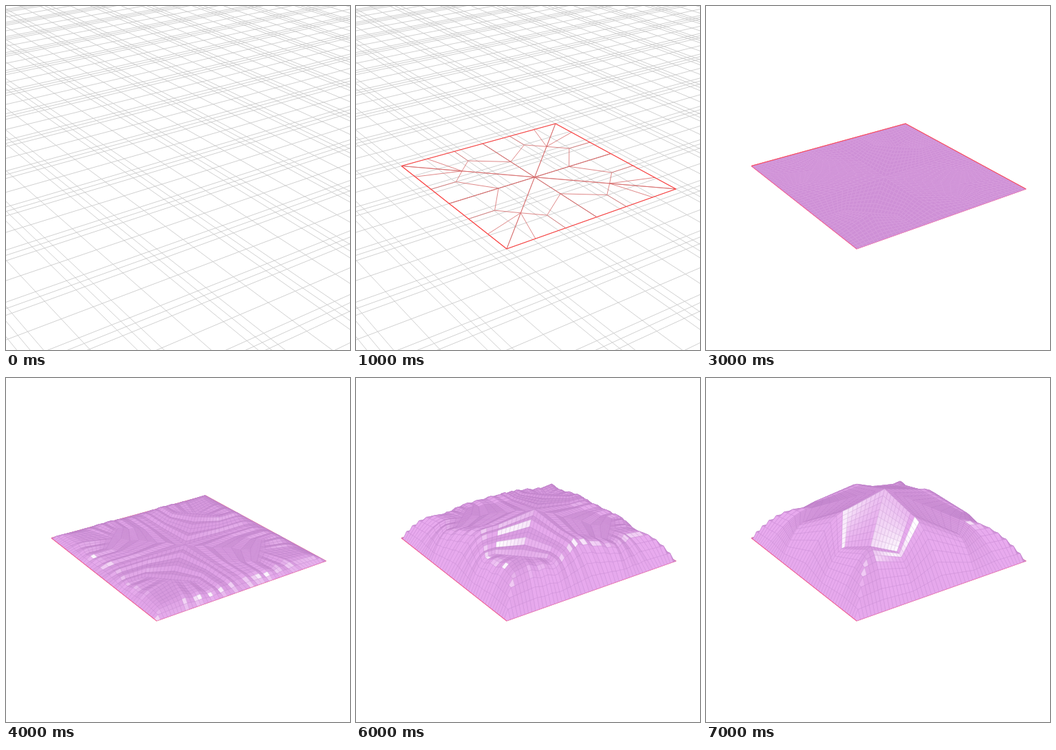
Animation of 500x500 px, one loop 8 s. Source, as an HTML page with a canvas:

```html
<!DOCTYPE html>
<html>
<head>
<meta charset="utf-8">
<style>
html, body { margin: 0; overflow: hidden; background: #fff; }
canvas { display: block; }
</style>
</head>
<body>
<canvas id="stage" width="500" height="500"></canvas>
<script>
const ctx = document.getElementById('stage').getContext('2d');
const STEP = 1000, STAGES = 8, CELLS = 8;

// Plan coordinates (unit square) and height to screen, in perspective
function project(u, v, z = 0) {
  const w = 1 + .11294 * u - .16978 * v;
  return [(66 + 256.75 * u + 115.82 * v) / w, (232.5 - 42.19 * u + 60.57 * v - z) / w];
}

function path(points) {
  ctx.beginPath();
  for (const p of points) ctx.lineTo(...project(...p));
}

function line(points, color, width = 1) {
  path(points);
  ctx.strokeStyle = color;
  ctx.lineWidth = width;
  ctx.stroke();
}

// Plan of one eighth of the square; the rest follows by symmetry
const A = [0, 0], E1 = [.153, 0], E2 = [.32, 0], MID = [.5, 0];
const FAN = [.231, .231], HEX = [.32, .1435], KITE = [.5, .281], CENTER = [.5, .5];
const CORNERS = [[0, 0], [1, 0], [1, 1], [0, 1]];

const turn = (p, n) => n ? turn([1 - p[1], p[0]], n - 1) : p;
const symmetries = [];
for (let n = 0; n < 4; n++)
  for (const swap of [false, true])
    symmetries.push({ swap, map: ([u, v]) => turn(swap ? [v, u] : [u, v], n) });

function drawGrid() {
  const bay = .36, gap = .04;
  const both = (c, from, to) => {
    line([[c, -4.5], [c, 2]], '#cbcbcb', .9);
    line([[from, c], [to, c]], '#cbcbcb', .9);
  };
  for (let k = -11; k < 14; k++) {
    const c = k * bay - gap;
    for (const offset of [-gap, 0, gap, bay / 2]) {
      const p = c + offset;
      if (p > -1.7) line([[p, -4.5], [p, 2]], '#cbcbcb', .9);
      if (p < 2) line([[-1.7, p], [5, p]], '#cbcbcb', .9);
    }
  }
}

function drawPattern() {
  const strokes = [[A, FAN, CENTER], [E1, FAN, HEX, KITE], [E2, HEX], [MID, KITE, CENTER]];
  for (const { map } of symmetries)
    for (const s of strokes) line(s.map(map), '#d66a6a', .8);
  line([...CORNERS, CORNERS[0]], '#ff3c3c', 1.1);
}

const lerp = (a, b, t) => a + (b - a) * t;
const bilinear = (a, b, c, d, s, t) => lerp(lerp(a, b, s), lerp(d, c, s), t);
const sub = (a, b) => a.map((x, i) => x - b[i]);
const dot = (a, b) => a.reduce((sum, x, i) => sum + x * b[i], 0);
const unit = a => a.map(x => x / Math.hypot(...a));
const cross = (a, b) => [a[1] * b[2] - a[2] * b[1], a[2] * b[0] - a[0] * b[2], a[0] * b[1] - a[1] * b[0]];

function buildCells({ fan, hex, kite, center, ripple, steep }) {
  const ramp = t => Math.sin(Math.PI / 2 * Math.min(1, t * steep));
  const wave = (q, n) => ripple * Math.sin(2 * Math.PI * n * q);
  const patches = [
    { at: [A, E1, FAN, [0, .153]], once: true, z: (s, t) => fan * ramp(Math.min(s, t)) },
    { at: [E1, E2, HEX, FAN],
      z: (s, t) => lerp(fan, hex, s) * ramp(t) + wave(s, 2) * Math.sin(Math.PI * t) },
    { at: [E2, MID, KITE, HEX], z: (s, t) => (lerp(hex, kite, s) + wave(s, 3)) * ramp(t) },
    { at: [HEX, KITE, CENTER, FAN],
      z: (s, t) => bilinear(hex, kite, center, fan, s, t) + wave(s, 3) }
  ];
  const cells = [];
  for (const { swap, map } of symmetries)
    for (const { at, once, z } of patches) {
      if (once && swap) continue;
      const point = (i, j) => {
        const s = i / CELLS, t = j / CELLS;
        const p = [0, 1].map(k => bilinear(...at.map(c => c[k]), s, t));
        return [...map(p), z(s, t)];
      };
      for (let i = 0; i < CELLS; i++)
        for (let j = 0; j < CELLS; j++)
          cells.push([point(i, j), point(i + 1, j), point(i + 1, j + 1), point(i, j + 1)]);
    }
  const depth = cell => cell.reduce((sum, p) => sum + p[0] - p[1], 0);
  return cells.sort((a, b) => depth(b) - depth(a));
}

const VIEW = unit([-.63, .63, .45]), GLOSS = unit([-.22, .4, .89]);

function shade(cell, flat) {
  if (flat) return 'rgb(206,144,214)';
  const [a, b, c, d] = cell.map(([u, v, z]) => [u, v, z / 252]);
  let n = unit(cross(sub(c, a), sub(d, b)));
  if (n[2] < 0) n = n.map(x => -x);
  const k = Math.max(-.4, Math.min(1, (dot(n, VIEW) - .45) / .35));
  const shine = Math.max(0, dot(n, GLOSS)) ** 90;
  const rgb = [214 + 18 * k, 153 + 17 * k, 221 + 17 * k].map(x => lerp(x, 255, shine));
  return `rgb(${rgb.map(Math.round)})`;
}

function drawMesh(shape) {
  const flat = !shape.center;
  line([...CORNERS, CORNERS[0]], '#ff5a6a', 1.2);
  for (const cell of buildCells(shape)) {
    path(cell);
    ctx.closePath();
    ctx.fillStyle = ctx.strokeStyle = shade(cell, flat);
    ctx.lineWidth = .6;
    ctx.fill();
    ctx.stroke();
    ctx.strokeStyle = flat ? 'rgba(228,176,232,.45)' : 'rgba(140,80,160,.3)';
    ctx.lineWidth = .5;
    ctx.stroke();
  }
  if (flat) line(CORNERS.slice(0, 3), '#ff4650', 1);
  line([[0, 0], [0, 1]], 'rgba(255,60,120,.65)', .9);
  line([[0, 1], [1, 1]], 'rgba(240,110,190,.4)', .8);
}

const SHAPES = [
  { fan: 0, hex: 0, kite: 0, center: 0, ripple: 0, steep: 1 },
  { fan: 7, hex: 7, kite: 6, center: 6, ripple: 1.2, steep: 2.5 },
  { fan: 23, hex: 22, kite: 20, center: 20, ripple: 2.2, steep: 2.2 },
  { fan: 37, hex: 37, kite: 49, center: 56, ripple: 1.3, steep: 1.4 },
  { fan: 50, hex: 46, kite: 71, center: 85, ripple: 0, steep: 1 }
];

let shown = -1;
function frame(now) {
  const stage = Math.floor(now / STEP) % STAGES;
  if (stage !== shown) {
    shown = stage;
    ctx.fillStyle = '#fff';
    ctx.fillRect(0, 0, 500, 500);
    ctx.lineJoin = 'round';
    if (stage < 2) drawGrid();
    if (stage === 1 || stage === 2) drawPattern();
    if (stage > 2) drawMesh(SHAPES[stage - 3]);
  }
  requestAnimationFrame(frame);
}
frame(0);
</script>
</body>
</html>
```
